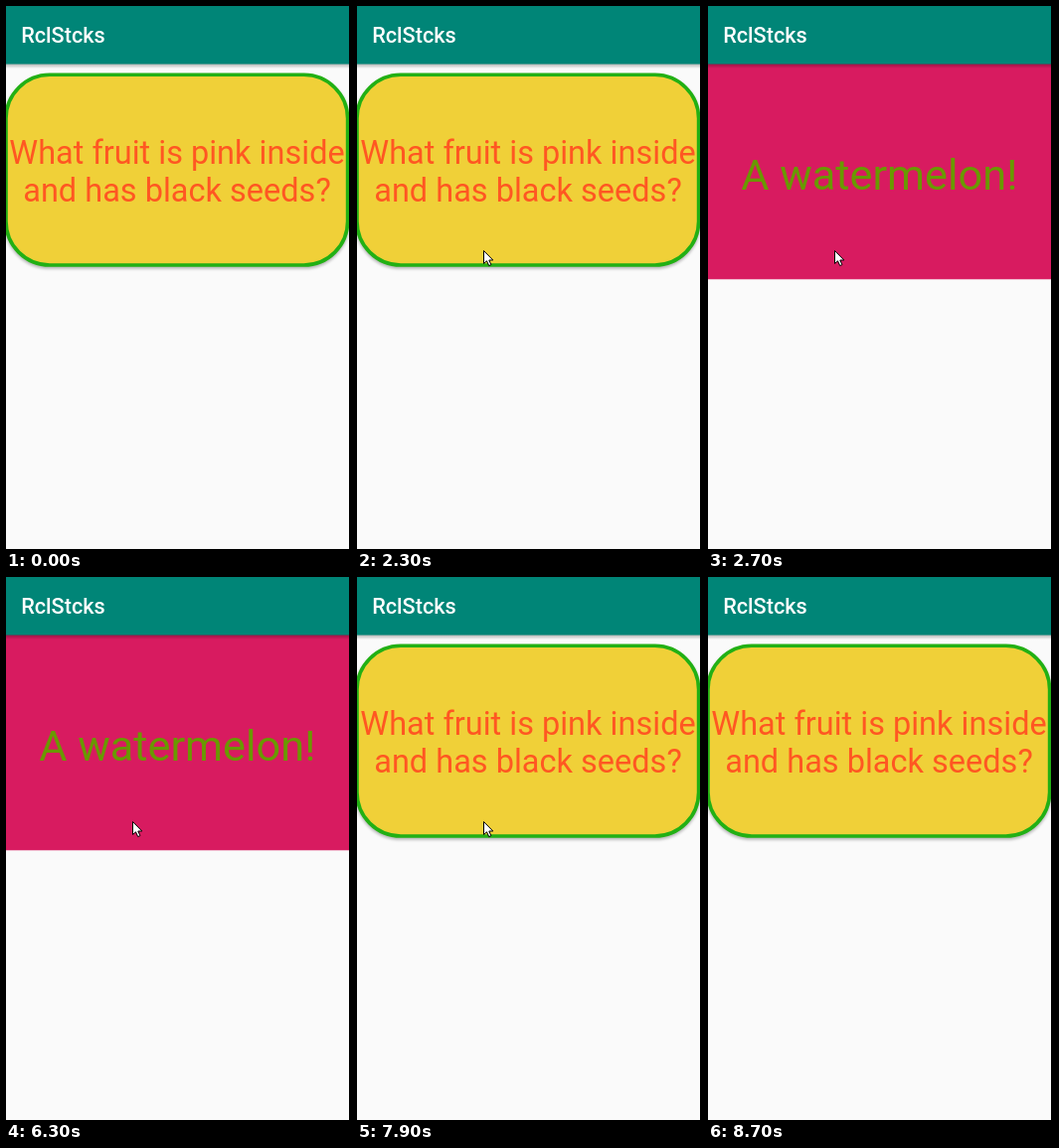
Write an HTML page that moves like this. It is 347 px wide and 547 px high and loops after 9.5 s.

```html
<!DOCTYPE html>
<html lang="en">
<head>
<meta charset="utf-8">
<title>Flash card</title>
<style>
  html, body { margin: 0; width: 100%; height: 100%; overflow: hidden; background: #fafafa; }
  svg { display: block; width: 100%; height: 100%; font-family: Roboto, sans-serif; }
  .title { font-size: 21.67px; font-weight: 500; fill: #fff; }
  .question { font-size: 32.5px; fill: #ff5722; text-anchor: middle; }
  .answer { font-size: 43.33px; fill: #699900; text-anchor: middle; }
  .card { fill: #f0d038; stroke: #22b014; stroke-width: 3.6px; filter: drop-shadow(0 2px 1.5px rgba(0, 0, 0, .28)); }
</style>
</head>
<body>
<svg viewBox="0 0 347 547">
  <defs>
    <linearGradient id="shade" x2="0" y2="1">
      <stop stop-opacity=".3"/>
      <stop offset="1" stop-opacity="0"/>
    </linearGradient>
  </defs>
  <rect width="347" height="547" fill="#fafafa"/>
  <g id="front">
    <rect class="card" x="0" y="69.3" width="343.6" height="191.7" rx="44"/>
    <text class="question" x="172" y="158.5">What fruit is pink inside</text>
    <text class="question" x="172" y="196.6">and has black seeds?</text>
  </g>
  <g id="back">
    <rect y="58" width="345" height="217.3" fill="#d81b60"/>
    <text class="answer" x="172.3" y="185">A watermelon!</text>
  </g>
  <rect y="58" width="345" height="5" fill="url(#shade)"/>
  <rect width="345" height="58.5" fill="#008577"/>
  <text class="title" x="15.2" y="36.5">RclStcks</text>
  <path id="cursor" d="M.5 .5V13.5L3.5 10.8L5.7 15.6L7.9 14.6L5.8 10H9.8Z" fill="#fff" stroke="#000"/>
  <rect x="345" width="2" height="547"/>
</svg>
<script>
  const LOOP = 9500;
  const STEP = 100;
  const [front, back, cursor] = ["front", "back", "cursor"].map(id => document.getElementById(id));

  // Pointer moves: start time, then one position per step; the last one holds.
  const moves = [
    [900, [334, 54], [205, 88], [88, 138], [124, 168]],
    [1500, [123, 190], [123, 216], [124, 240], [125, 254]],
    [2200, [126, 250], [127, 246]],
    [8200, [119, 232], [96, 193], [66, 142], [34, 87], [4, 36], null]
  ];
  const flips = [2700, 4400, 6300, 7900];

  function pointerAt(time) {
    const move = moves.filter(([start]) => start <= time).pop();
    if (!move) return null;
    const [start, ...points] = move;
    return points[Math.min(points.length - 1, Math.floor((time - start) / STEP))];
  }

  function show(element, visible) {
    element.style.display = visible ? "" : "none";
  }

  function draw() {
    const time = performance.now() % LOOP;
    const flipped = flips.filter(flip => flip <= time).length % 2 === 1;
    const point = pointerAt(time);
    show(front, !flipped);
    show(back, flipped);
    show(cursor, point);
    if (point) cursor.setAttribute("transform", `translate(${point})`);
    requestAnimationFrame(draw);
  }
  draw();
</script>
</body>
</html>
```
